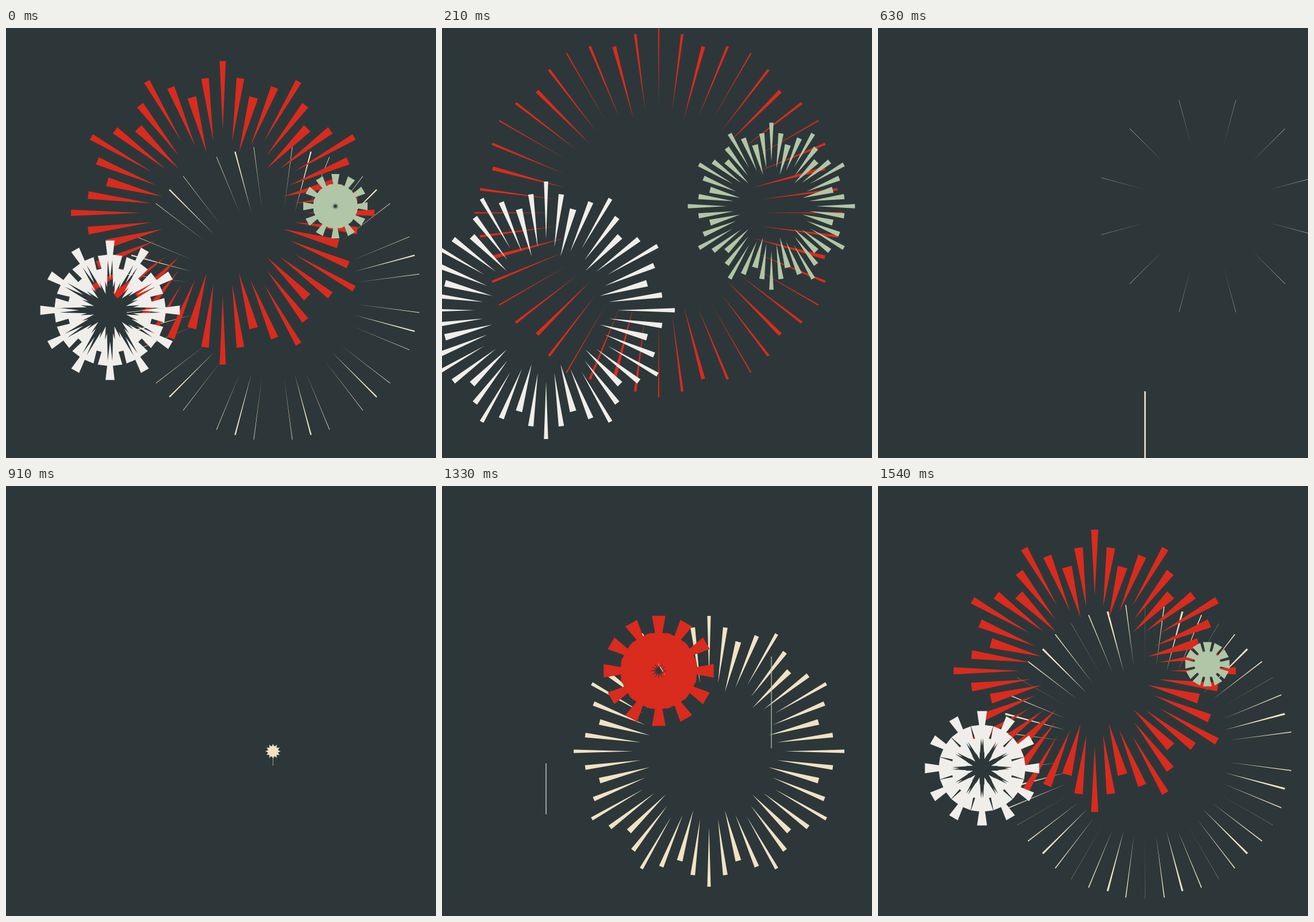
Recreate the animation shown at these times as an HTML page with a canvas. Size 748 by 748 pixels, loop 1610 ms.

```html
<!DOCTYPE html>
<html lang="en">
<head>
<meta charset="utf-8">
<title>Fireworks</title>
<style>
  html, body { margin: 0; width: 100%; height: 100%; overflow: hidden; background: #2d3739; }
  canvas { display: block; }
</style>
</head>
<body>
<canvas id="sky" width="748" height="748"></canvas>
<script>
const ctx = document.getElementById('sky').getContext('2d');

const STEP = 70;      // ms each pose is held
const POSES = 23;
const PERIOD = 22.5;  // loop length in steps; the last step is a short one
const LEAD = 8;       // steps before a burst in which its rocket may rise

// Back to front; start is the step at which the burst opens.
const fireworks = [
  { x: 464.5, y: 461.5, scale: 0.8,   start: 12.87, color: '#f0e2c4' },
  { x: 377,   y: 321.5, scale: 1,     start: 17.4,  color: '#d92b1e' },
  { x: 181,   y: 491,   scale: 0.8,   start: 19.9,  color: '#f0eeea' },
  { x: 573,   y: 310,   scale: 0.595, start: 20.93, color: '#b0c6a6' },
];

const clamp01 = v => Math.min(1, Math.max(0, v));
const sineOut = v => Math.sin(clamp01(v) * Math.PI / 2);

function drawTrail(t) {
  const width = 0.9 - 0.62 * t;
  if (t > 1.4) return;
  const top = 11.8 * t + 275 * Math.max(0, -2.9 - t) ** 2;
  const bottom = (0.775 * (3.18 - t)) ** 4;
  if (bottom > top) ctx.fillRect(-width / 2, top, width, bottom - top);
}

// Ray kinds: 0 leads, 1 and 2 follow later and last longer.
function rayShape(t, kind) {
  const left = clamp01(1 - (t - 0.55 * kind) / (9.4 + 0.42 * kind));
  return {
    outer: 321 * sineOut((t - 0.42 * kind) / (8.3 + 0.6 * kind)),
    inner: 185 * sineOut((t - 0.8 - 0.33 * kind) / (7.6 + 0.75 * kind)),
    half: 15 * left ** 1.3,
  };
}

function drawBurst(t) {
  if (t <= 0) return;
  const shapes = [0, 1, 2].map(kind => rayShape(t, kind));
  ctx.beginPath();
  for (let i = 0; i < 48; i++) {
    const { outer, inner, half } = shapes[[0, 1, 2, 1][i % 4]];
    if (!outer || !half) continue;
    const angle = i * Math.PI / 24, c = Math.cos(angle), s = Math.sin(angle);
    ctx.moveTo(inner * c, inner * s);
    ctx.lineTo(outer * c + half * s, outer * s - half * c);
    ctx.lineTo(outer * c - half * s, outer * s + half * c);
    ctx.closePath();
  }
  ctx.fill();
}

function draw(now) {
  const pose = Math.floor(now / STEP) % POSES;
  ctx.fillStyle = '#2d3739';
  ctx.fillRect(0, 0, 748, 748);
  for (const { x, y, scale, start, color } of fireworks) {
    const t = (pose - start + LEAD + PERIOD) % PERIOD - LEAD;
    ctx.save();
    ctx.translate(x, y);
    ctx.scale(scale, scale);
    ctx.fillStyle = color;
    drawTrail(t);
    drawBurst(t);
    ctx.restore();
  }
}

function tick() {
  draw(performance.now());
  requestAnimationFrame(tick);
}
tick();
</script>
</body>
</html>
```
